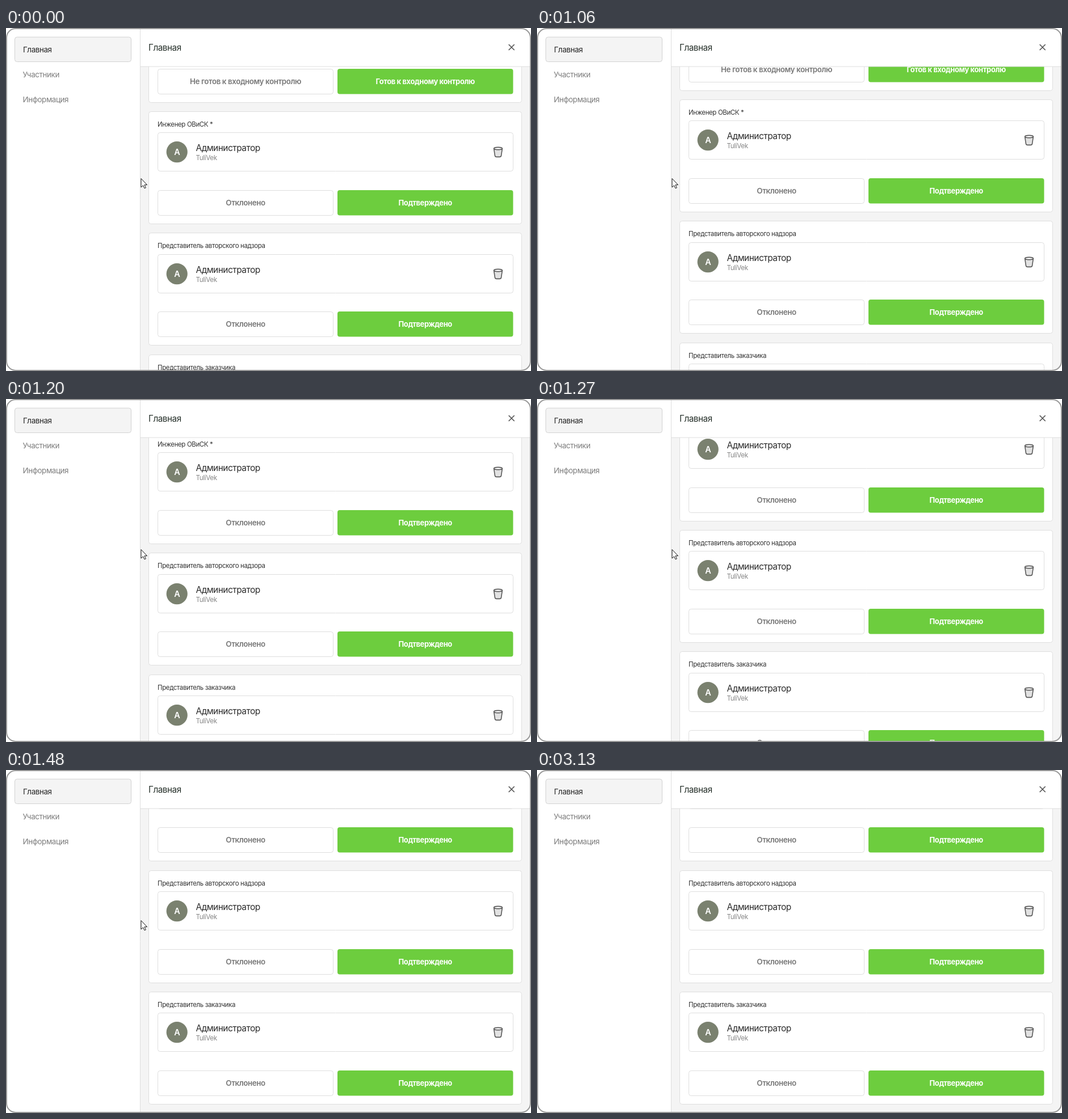
An HTML page with a canvas that plays this animation: 925 by 605 pixels, repeating every 4650 ms.

```html
<!DOCTYPE html>
<html lang="ru">
<head>
<meta charset="utf-8">
<title>Главная</title>
<style>
html, body { margin: 0; width: 100%; height: 100%; overflow: hidden; background: #fff; }
canvas { display: block; }
</style>
</head>
<body>
<canvas id="stage" width="925" height="605"></canvas>
<script>
const ctx = document.getElementById('stage').getContext('2d');
const LOOP = 4650;
const PITCH = 214.3;
const GREEN = '#6dcd3e';
const LINE = '#dedede';

// Wheel scroll: one position per 70 ms tick
const SCROLL = { start: 990, tick: 70, at: [4.7, 21, 48.2, 90, 130.3, 161, 179, 184.7] };

const CARDS = [
  { title: '', no: 'Не готов к входному контролю', yes: 'Готов к входному контролю' },
  { title: 'Инженер ОВиСК *' },
  { title: 'Представитель авторского надзора' },
  { title: 'Представитель заказчика' }
];

const snap = v => Math.floor(v) + 0.5;

function box(x, y, w, h, r, fill, stroke) {
  ctx.beginPath();
  ctx.roundRect(x, y, w, h, r);
  ctx.fillStyle = fill;
  ctx.fill();
  if (stroke) {
    ctx.strokeStyle = stroke;
    ctx.lineWidth = 1;
    ctx.stroke();
  }
}

function text(str, x, y, size, color, weight = 400, align = 'left') {
  ctx.font = `${weight} ${size}px Inter, "Noto Sans", sans-serif`;
  ctx.letterSpacing = (-0.03 * size).toFixed(3) + 'px';
  ctx.textAlign = align;
  ctx.fillStyle = color;
  ctx.fillText(str, x, y);
}

function line(color, width, ...pts) {
  ctx.beginPath();
  for (let i = 0; i < pts.length; i += 4) {
    ctx.moveTo(pts[i], pts[i + 1]);
    ctx.lineTo(pts[i + 2], pts[i + 3]);
  }
  ctx.strokeStyle = color;
  ctx.lineWidth = width;
  ctx.stroke();
}

function bin(x, y) {
  ctx.save();
  ctx.translate(x, y);
  ctx.strokeStyle = '#595959';
  ctx.lineWidth = 1.6;
  ctx.lineJoin = 'round';
  ctx.beginPath();
  ctx.moveTo(-7.4, -6.2);
  ctx.lineTo(-5.6, 6);
  ctx.quadraticCurveTo(-5.2, 8.6, -2.6, 8.6);
  ctx.lineTo(2.6, 8.6);
  ctx.quadraticCurveTo(5.2, 8.6, 5.6, 6);
  ctx.lineTo(7.4, -6.2);
  ctx.fillStyle = '#e2e2e2';
  ctx.fill();
  ctx.stroke();
  ctx.beginPath();
  ctx.ellipse(0, -6.3, 7.4, 2.1, 0, 0, Math.PI * 2);
  ctx.fillStyle = '#fff';
  ctx.fill();
  ctx.stroke();
  ctx.restore();
}

function person(y) {
  box(267.5, y, 626, 68, 4, '#fff', LINE);
  ctx.beginPath();
  ctx.arc(301.2, y + 34.2, 18.6, 0, Math.PI * 2);
  ctx.fillStyle = '#7a816f';
  ctx.fill();
  text('A', 301.2, y + 39.5, 14.5, '#fff', 600, 'center');
  text('Администратор', 334.5, y + 32.5, 15.4, '#2b2b2b');
  text('TuliVek', 334.5, y + 48.5, 11.6, '#858585');
  bin(867, y + 34.3);
}

function card({ title, no = 'Отклонено', yes = 'Подтверждено' }, top) {
  const y = snap(top);
  box(251.5, y, 657, 198, 4, '#fff', LINE);
  text(title, 267, y + 26.5, 11.45, '#333');
  person(snap(top + 37.2));
  const by = snap(top + 139);
  box(267.5, by, 309, 44, 4, '#fff', LINE);
  box(584, by - 0.5, 309.5, 44.5, 4, GREEN);
  text(no, 422, by + 26.5, 13.35, '#777', 600, 'center');
  text(yes, 738.7, by + 26.5, 13, '#fff', 700, 'center');
}

function sidebar() {
  box(15.5, 16, 205, 43.5, 4, '#f4f4f4', '#d2d2d2');
  text('Главная', 30, 42.5, 13.4, '#252525');
  text('Участники', 29.5, 87, 13.4, '#7d7d7d');
  text('Информация', 29.5, 131, 13.4, '#7d7d7d');
  line(LINE, 1, 236.5, 0, 236.5, 605);
}

function header() {
  ctx.fillStyle = '#fff';
  ctx.fillRect(237, 0, 688, 68);
  line(LINE, 1, 237, 68, 925, 68);
  text('Главная', 251, 39.5, 15.3, '#26302a');
  line('#555', 1.7, 885.7, 29, 895.7, 39, 895.7, 29, 885.7, 39);
}

function pointer(x, y) {
  const pts = [0, 0, 0, 15.5, 3.6, 12.2, 6, 17.3, 8.3, 16.3, 6, 11.2, 10.6, 11.2];
  ctx.beginPath();
  for (let i = 0; i < pts.length; i += 2) ctx.lineTo(x + pts[i], y + pts[i + 1]);
  ctx.closePath();
  ctx.fillStyle = '#fff';
  ctx.fill();
  ctx.strokeStyle = '#111';
  ctx.lineWidth = 1;
  ctx.lineJoin = 'miter';
  ctx.stroke();
}

function scrollAt(t) {
  if (t < SCROLL.start) return 0;
  const i = Math.floor((t - SCROLL.start) / SCROLL.tick);
  return SCROLL.at[Math.min(i, SCROLL.at.length - 1)];
}

function drawPointer(t) {
  if (t < 2930) pointer(238, 265.5);
  else if (t < 3060) pointer(238, 266.5);
  else if (t < 3130) pointer(225.5, 267.5);
}

function draw(t) {
  ctx.fillStyle = '#fff';
  ctx.fillRect(0, 0, 925, 605);

  ctx.save();
  ctx.beginPath();
  ctx.roundRect(1, 1, 923, 603, 16);
  ctx.clip();
  ctx.fillStyle = '#f4f4f4';
  ctx.fillRect(237, 68, 688, 537);
  const top = 147.6 - PITCH - scrollAt(t);
  CARDS.forEach((c, i) => card(c, top + i * PITCH));
  header();
  sidebar();
  ctx.restore();

  ctx.beginPath();
  ctx.roundRect(1, 1, 923, 603, 16);
  ctx.strokeStyle = '#999';
  ctx.lineWidth = 2;
  ctx.stroke();
  drawPointer(t);
}

const begin = performance.now();
function loop() {
  draw((performance.now() - begin) % LOOP);
  requestAnimationFrame(loop);
}
loop();
</script>
</body>
</html>
```
